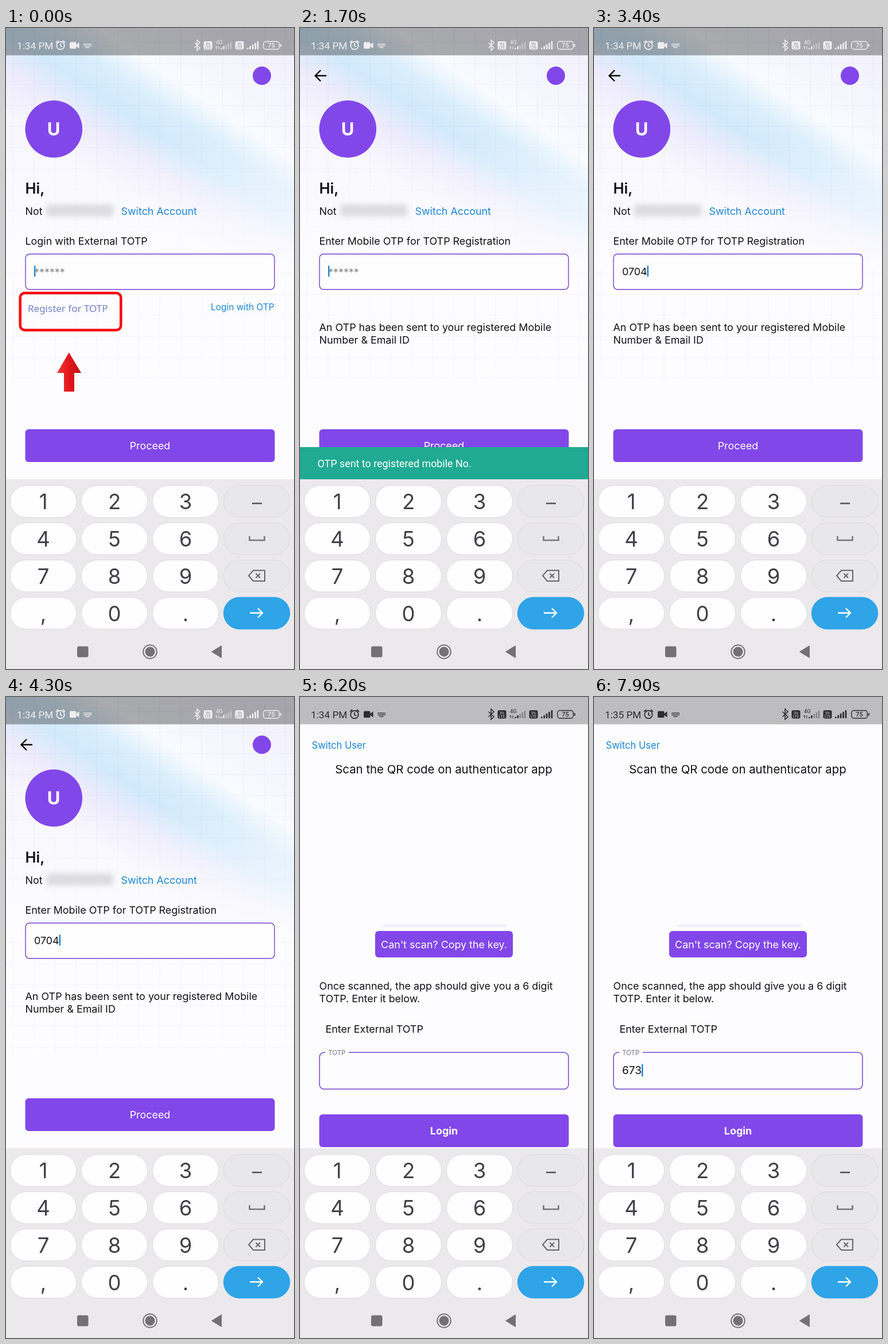
An HTML page that plays this animation: 502 by 1115 pixels, repeating every 8000 ms.

```html
<!DOCTYPE html>
<html lang="en">
<head>
<meta charset="utf-8">
<title>TOTP registration</title>
<style>
  html, body { margin: 0; width: 100%; height: 100%; overflow: hidden; background: #fdfcff; }
  svg { display: block; width: 100%; height: 100%; }
  text { font-family: Inter, Roboto, sans-serif; font-size: 17.9px; font-optical-sizing: none; fill: #121214; white-space: pre; }
  .roboto { font-family: Roboto, Inter, sans-serif; }
  .noto { font-family: "Noto Sans", "Open Sans", sans-serif; }
  #status text { fill: currentColor; }
</style>
</head>
<body>
<svg id="stage" viewBox="0 0 502 1115" xmlns="http://www.w3.org/2000/svg"></svg>
<script>
const LOOP = 8000;
const PURPLE = '#8247e9', LINK = '#1e87d0';
const SCREEN_SWAP = 700, SNACK_IN = 1000, SNACK_OUT = 1800;
const SUBMIT = 5300, SLIDE = 5360, DARK_ICONS = 5500, NEXT_MINUTE = 6800;
const OTP = { code: '070482', times: [1900, 2100, 2300, 3000, 4700, 4900] };
const TOTP = { code: '673', times: [6600, 7100, 7500] };
const CURSOR_RESETS = [0, SCREEN_SWAP, ...OTP.times, SUBMIT, ...TOTP.times];

const clamp = v => Math.max(0, Math.min(1, v));
const text = (x, y, s, attrs = '') => `<text x="${x}" y="${y}" ${attrs}>${s}</text>`;
const rect = (x, y, w, h, rx, attrs) =>
  `<rect x="${x}" y="${y}" width="${w}" height="${h}" rx="${rx}" ${attrs}/>`;
const path = (d, attrs) => `<path d="${d}" ${attrs}/>`;
const style = css => `style="${css}"`;
const link = style(`fill:${LINK}`);
const line = (color, width) => `fill="none" stroke="${color}" stroke-width="${width}"`;
const button = (x, y, w, h, label, weight = 400) =>
  rect(x, y, w, h, 6, `fill="${PURPLE}"`) +
  text(x + w / 2, y + h / 2 + 6.7, label, `text-anchor="middle" ${style(`fill:#fff;font-weight:${weight}`)}`);

const defs = `<defs>
  <linearGradient id="streak" gradientUnits="userSpaceOnUse" x1="177" y1="273" x2="362" y2="-1">
    <stop offset="0" stop-color="#f8f7fe"/>
    <stop offset=".2" stop-color="#eeecfc"/>
    <stop offset=".37" stop-color="#d2eafc"/>
    <stop offset=".5" stop-color="#daeefc"/>
    <stop offset=".65" stop-color="#f8fbff"/>
    <stop offset="1" stop-color="#f4f3fd"/>
  </linearGradient>
  <linearGradient id="fade" x1="0" y1="0" x2="0" y2="1">
    <stop offset="0" stop-color="#fdfcff" stop-opacity="0"/>
    <stop offset="1" stop-color="#fdfcff"/>
  </linearGradient>
  <linearGradient id="arrowRed">
    <stop offset="0" stop-color="#f0373a"/>
    <stop offset=".5" stop-color="#e3151c"/>
    <stop offset="1" stop-color="#b90c13"/>
  </linearGradient>
  <pattern id="grid" width="36.5" height="36.5" patternUnits="userSpaceOnUse" x="12" y="25">
    <path d="M0 .5H36.5M.5 0V36.5" stroke="#6a78a8" stroke-opacity=".07" fill="none"/>
  </pattern>
  <filter id="blur" x="-20%" y="-60%" width="140%" height="220%"><feGaussianBlur stdDeviation="5"/></filter>
  <filter id="softLine" x="-10%" y="-300%" width="120%" height="700%"><feGaussianBlur stdDeviation="1.5"/></filter>
  <clipPath id="scroll"><rect y="118.5" width="502" height="680"/></clipPath>
</defs>`;

function loginPage() {
  return `<g id="login">
    <rect width="502" height="1115" fill="#fdfcff"/>
    <rect width="502" height="420" fill="url(#streak)"/>
    <rect width="502" height="620" fill="url(#grid)"/>
    <rect y="190" width="502" height="231" fill="url(#fade)"/>
    <rect y="420" width="502" height="380" fill="url(#fade)"/>
    <circle cx="446" cy="83" r="16" fill="${PURPLE}"/>
    <circle cx="83.3" cy="175.7" r="49.8" fill="${PURPLE}"/>
    ${text(83, 187, 'U', `text-anchor="middle" ${style('fill:#fff;font-weight:700;font-size:31px')}`)}
    ${text(33.5, 287.5, 'Hi,', style('font-weight:600;font-size:25.5px'))}
    ${text(33.5, 324.5, 'Not')}
    ${rect(70, 307, 117, 21, 4, 'fill="#dcdbe1" filter="url(#blur)"')}
    ${text(200.5, 324.5, 'Switch Account', link)}
    ${text(33.5, 376.5, '', 'id="otpLabel"')}
    ${rect(34, 393.2, 434, 61.6, 7, `id="otpBox" fill="#fefdff" stroke-width="1.4"`)}
    ${text(49, 431, '******', `id="stars" ${style('fill:#85858a')}`)}
    ${text(49, 429.7, '', 'id="otp"')}
    <rect id="otpCursor" y="413.5" width="2.4" height="19" fill="${LINK}"/>
    ${button(33.5, 698, 435, 57, 'Proceed')}
    <g id="register">
      ${text(38, 494, 'Register for TOTP', `class="noto" ${style('fill:#7482c6;font-weight:500;font-size:17px')}`)}
      ${text(467.5, 491.3, 'Login with OTP', `text-anchor="end" ${style(`fill:${LINK};font-size:15.4px`)}`)}
      ${rect(24.7, 461, 175.6, 64.5, 8, line('#f7080c', 4.6))}
      ${path('M109.7 564.5L131 600H119V632.5H101V600H89Z', 'fill="url(#arrowRed)"')}
    </g>
    <g id="sent">
      ${text(33.5, 527, 'An OTP has been sent to your registered Mobile')}
      ${text(33.5, 548.5, 'Number &amp; Email ID')}
    </g>
    ${path('M46 83H27M36 73.5L26.5 83L36 92.5', `id="back" ${line('#080808', 2.4)}`)}
  </g>`;
}

function scanPage() {
  return `<g id="scan">
    <rect width="502" height="1115" fill="#fdfcff"/>
    ${text(20.5, 89.8, 'Switch User', style(`fill:${LINK};font-size:16.6px`))}
    <g clip-path="url(#scroll)">
      ${text(250.5, 132.5, 'Scan the QR code on authenticator app', `text-anchor="middle" ${style('font-size:20.4px')}`)}
    </g>
    ${rect(145, 396, 216, 3, 1, 'fill="#e9e5fb" filter="url(#softLine)"')}
    ${button(131, 407, 240, 46, "Can't scan? Copy the key.")}
    ${text(33.5, 509.3, 'Once scanned, the app should give you a 6 digit')}
    ${text(33.5, 531.2, 'TOTP. Enter it below.')}
    ${text(44.5, 583.5, 'Enter External TOTP')}
    ${path('', `id="totpBox" ${line('#7443c9', 1.5)}`)}
    ${text(49, 622.5, 'TOTP', 'id="totpLabel"')}
    ${text(49, 655.8, '', `id="totp" ${style('font-size:19px')}`)}
    <rect id="totpCursor" y="638.5" width="2.5" height="21.5" fill="${LINK}"/>
    ${button(33.5, 726, 435, 57, 'Login', 700)}
  </g>`;
}

function keyboard() {
  const rows = ['123-', '456_', '789<', ',0.>'];
  const icons = {
    '-': path('M429 827H446', line('#55555a', 2.6)),
    '_': path('M424.5 884V891H450.500V884', line('#77777b', 2.6)),
    '<': path('M431 943.500H451V962H431L423 952.700ZM435.500 949L443 956.500M443 949L435.500 956.500', line('#66666a', 2)),
    '>': path('M425 1017.500H447M439 1009.500L447 1017.500L439 1025.500', line('#fff', 2.3))
  };
  let out = '<rect y="785" width="502" height="330" fill="#ebe9ec"/>';
  rows.forEach((row, r) => [...row].forEach((key, c) => {
    const x = 7.3 + c * 124, y = 795.8 + r * 64.8;
    const fill = key === '>' ? '#2fa4e7' : c === 3 ? '#e8e7ea' : '#fefdff';
    const edge = key === '>' ? '#2fa4e7' : '#dbdade';
    out += rect(x, y, 115.5, 55.5, 27.7, `fill="${fill}" stroke="${edge}"`);
    out += icons[key] || text(x + 57.8, y + 41.5, key,
      `text-anchor="middle" ${style('fill:#414146;font-size:36.5px')}`);
  }));
  return out +
    rect(124, 1075.5, 19.5, 19, 3, 'fill="#737176"') +
    `<circle cx="251" cy="1085" r="11.8" ${line('#737176', 2)}/>` +
    '<circle cx="251" cy="1085" r="8.500" fill="#737176"/>' +
    path('M375.500 1074.500V1095.500L358.500 1085Z', 'fill="#737176" stroke="#737176" stroke-linejoin="round"');
}

function statusBar() {
  const bars = (x, y, n, step, h) => Array.from({ length: 5 }, (_, i) => {
    const tall = h * (i + 1) / 5;
    return rect(x + i * step, y - tall, step - 1.7, tall, .8, `fill="currentColor" opacity="${i < n ? 1 : .4}"`);
  }).join('');
  const volte = x => rect(x, 23, 15, 14.500, 3, 'fill="currentColor"') +
    ['Vo', 'LTE'].map((s, i) => text(x + 7.5, 29.5 + i * 6, s,
      `text-anchor="middle" ${style('fill:#a3a3a6;font-size:6px;font-weight:700')}`)).join('');
  const stroke = line('currentColor', 1.8);
  return `<rect width="502" height="47.500" id="statusShade"/>
  <g id="status">
    ${text(19, 36.5, '', `id="clock" class="roboto" ${style('font-size:17.2px')}`)}
    <circle cx="95" cy="30.500" r="6.800" ${stroke}/>
    ${path('M95 26.500V31L98 32.500M87 25.500L91 22M103 25.500L99 22', stroke)}
    ${rect(111, 24.5, 11.5, 11.5, 2, 'fill="currentColor"')}
    ${path('M122 29.500L127.500 25V35.500L122 31Z', 'fill="currentColor"')}
    ${path('M135.500 28H149M135.500 31H149M138.500 34H146', `${stroke} stroke-dasharray="1.700 .8"`)}
    ${path('M328.500 25.500L338 34.500L333 39V21L338 25.500L328.500 34.500', line('currentColor', 1.6))}
    ${volte(344.5)}
    ${text(366, 28, '4G', `class="roboto" ${style('font-size:9.5px')}`)}
    ${path('M367 37V32M365.500 33.500L367 32L368.500 33.500M371 32V37', line('currentColor', 1))}
    ${bars(374, 37, 2, 4.2, 13)}
    ${volte(399.5)}
    ${bars(420, 37, 5, 4.4, 14)}
    ${rect(448.8, 23.5, 27.5, 13.5, 4, line('currentColor', 1.4))}
    ${path('M478.800 28V32.500', line('currentColor', 2))}
    ${text(462.5, 34.2, '75', `text-anchor="middle" class="roboto" ${style('font-size:11px;font-weight:500')}`)}
  </g>`;
}

const stage = document.getElementById('stage');
stage.innerHTML = defs + loginPage() + scanPage() +
  `<g id="snack"><rect y="729" width="502" height="57" fill="#20a993"/>
   ${text(30.5, 763.5, 'OTP sent to registered mobile No.', `class="roboto" ${style('fill:#fff')}`)}</g>` +
  keyboard() + statusBar();

const ui = {};
stage.querySelectorAll('[id]').forEach(node => ui[node.id] = node);
const set = (node, attrs) => Object.entries(attrs).forEach(([k, v]) => node.setAttribute(k, v));
const show = (node, on) => node.setAttribute('visibility', on ? 'inherit' : 'hidden');
const typed = (entry, t) => entry.code.slice(0, entry.times.filter(at => t >= at).length);

function cursorVisible(t) {
  const last = Math.max(...CURSOR_RESETS.filter(at => at <= t));
  return (t - last) % 1000 < 500;
}

function typeInto(field, cursor, value, visible) {
  field.textContent = value;
  set(cursor, { x: 49 + (value ? field.getComputedTextLength() : 0) });
  show(cursor, visible);
}

function drawTotpField(t) {
  const p = clamp((t - SUBMIT - 30) / 140);
  set(ui.totpBox, {
    d: `M${44 + 41 * p} 618.2H460a8 8 0 0 1 8 8V674a8 8 0 0 1 -8 8H42a8 8 0 0 1 -8 -8V626.2a8 8 0 0 1 8 -8H44`
  });
  set(ui.totpLabel, { y: 655 - 32.5 * p, style: `font-size:${16.5 - 5 * p}px;fill:#78777d` });
}

function render(t) {
  const registering = t >= SCREEN_SWAP, submitted = t >= SUBMIT, blink = cursorVisible(t);

  ui.otpLabel.textContent = registering ? 'Enter Mobile OTP for TOTP Registration' : 'Login with External TOTP';
  show(ui.register, !registering);
  show(ui.sent, registering);
  show(ui.back, registering && !submitted);
  const otp = submitted ? '' : typed(OTP, t);
  show(ui.stars, !otp);
  typeInto(ui.otp, ui.otpCursor, otp, blink && !submitted);
  set(ui.otpBox, { stroke: submitted ? '#b9aadd' : '#7443c9' });

  const rise = clamp((t - SNACK_IN) / 200);
  show(ui.snack, t >= SNACK_IN && t < SNACK_OUT);
  set(ui.snack, { transform: `translate(0 ${57 * (1 - rise) ** 2})` });

  const slide = clamp((t - SLIDE) / 300);
  show(ui.scan, t >= SLIDE);
  set(ui.scan, { transform: `translate(${502 * (1 - slide) ** 2} 0)` });
  drawTotpField(t);
  typeInto(ui.totp, ui.totpCursor, typed(TOTP, t), blink && t >= SLIDE);

  const dark = t >= DARK_ICONS;
  set(ui.status, { color: dark ? '#2d2c2e' : '#efeef0' });
  set(ui.statusShade, { fill: '#000', 'fill-opacity': dark ? .255 : .32 });
  ui.clock.textContent = t >= NEXT_MINUTE ? '1:35 PM' : '1:34 PM';
}

const start = performance.now();
function frame() {
  render((performance.now() - start) % LOOP);
  requestAnimationFrame(frame);
}
frame();
</script>
</body>
</html>
```
